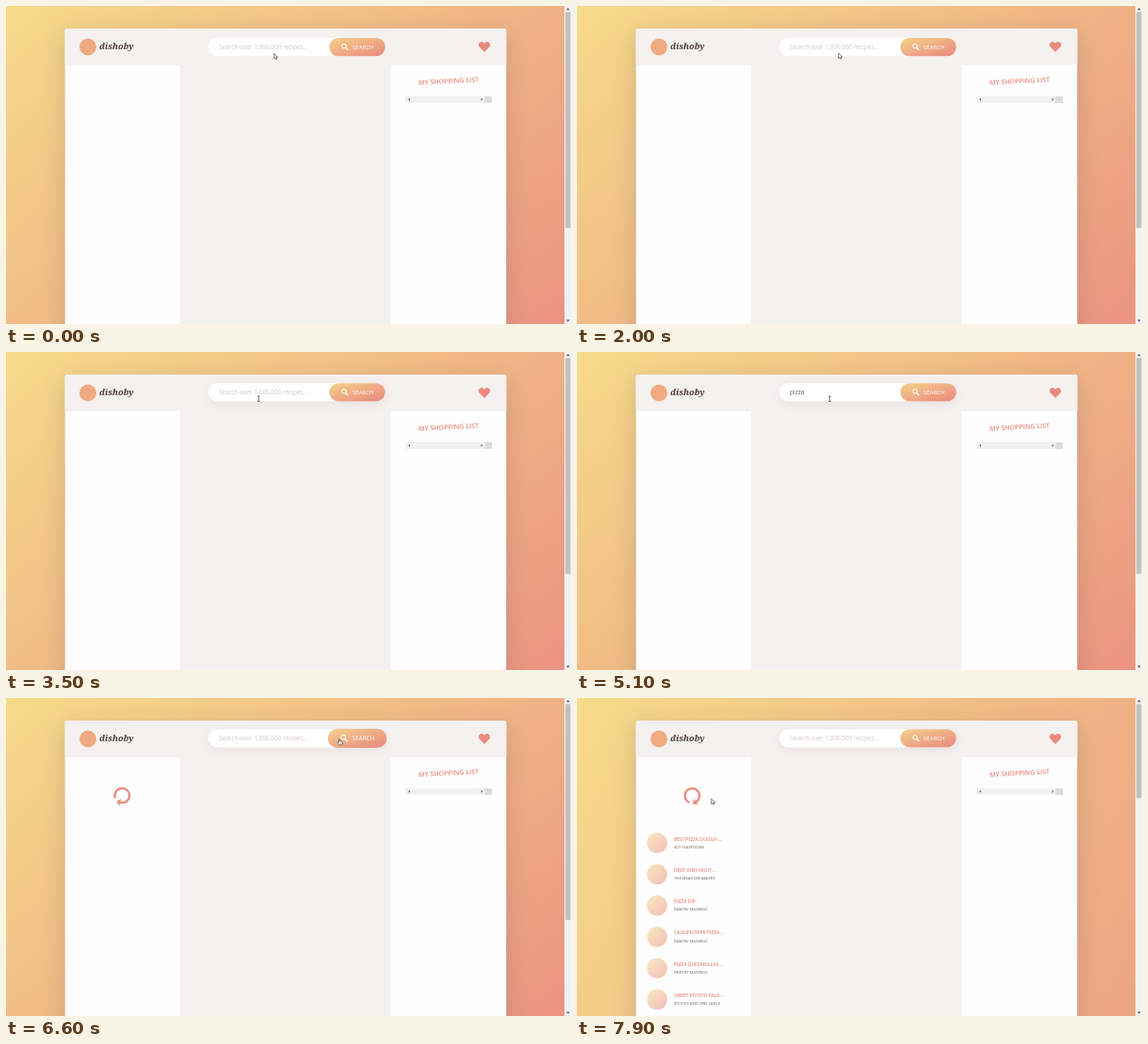
An HTML page that plays this animation: 600x338 px, repeating every 8 s.

```html
<!DOCTYPE html>
<html lang="en">
<head>
<meta charset="utf-8">
<title>Recipe search</title>
<style>
html, body { margin: 0; width: 100%; height: 100%; overflow: hidden; background: #fff; }
svg { display: block; width: 100vw; height: 100vh; }
text { font-family: "Open Sans", "Noto Sans", sans-serif; }
.brand { font: italic bold 9.2px "Noto Serif", serif; fill: #4a3b37; }
.coral { fill: #e98a7d; }
.muted { fill: #8d8380; }
</style>
</head>
<body>
<svg id="stage" viewBox="0 0 600 338" preserveAspectRatio="none">
  <defs>
    <linearGradient id="page" gradientUnits="userSpaceOnUse">
      <stop stop-color="#f6db8a"/><stop offset="1" stop-color="#e98780"/>
    </linearGradient>
    <linearGradient id="warm" gradientUnits="userSpaceOnUse" x1="364" y1="15" x2="382" y2="72">
      <stop offset=".2" stop-color="#f4d188"/><stop offset=".8" stop-color="#e98880"/>
    </linearGradient>
    <linearGradient id="dish" x2="1" y2="1">
      <stop stop-color="#f8e8c0"/><stop offset="1" stop-color="#f3beb8"/>
    </linearGradient>
    <filter id="blur" filterUnits="userSpaceOnUse" x="-20" y="-40" width="640" height="600"><feGaussianBlur stdDeviation="11.7"/></filter>
    <filter id="soft" filterUnits="userSpaceOnUse" x="180" y="0" width="260" height="100"><feGaussianBlur stdDeviation="5.5"/></filter>
  </defs>

  <rect width="600" height="338" fill="url(#page)"/>
  <rect id="shade" x="61" y="30" width="472" rx="3" fill="#655a56" opacity=".24" filter="url(#blur)"/>
  <rect x="62.7" y="24" width="468.5" height="340" rx="2.3" fill="#fefefe"/>
  <path d="M62.7 63V26.3a2.3 2.3 0 0 1 2.3-2.3H529a2.3 2.3 0 0 1 2.3 2.3V63H408.5V338H185V63Z" fill="#f5f1f0"/>

  <circle cx="87" cy="43.5" r="9" fill="#efaa80"/>
  <text class="brand" x="99" y="46">dishoby</text>

  <g id="search">
    <rect id="lift" x="215" y="36.7" width="188" height="19" rx="9.5" fill="#655a56" filter="url(#soft)"/>
    <rect x="214.7" y="34" width="188" height="19.2" rx="9.6" fill="#fff"/>
    <text id="query" x="226" y="45.8" font-size="6.5"></text>
    <rect id="caret" y="39.5" width=".5" height="8" fill="#655a56"/>
    <g id="button">
      <rect x="343.3" y="34" width="59.5" height="19.2" rx="9.6" fill="url(#warm)"/>
      <g fill="none" stroke="#fff" stroke-linecap="round">
        <circle cx="359" cy="42.6" r="2.3" stroke-width="1"/><path d="M360.9 44.6l2 2" stroke-width="1.4"/>
      </g>
      <text x="368" y="45.6" font-size="6" fill="#fff">SEARCH</text>
    </g>
  </g>

  <path class="coral" d="M508 49L502.900 43.700C500.500 41 502.500 38 505 38C506.500 38 507.500 39 508 39.800C508.500 39 509.500 38 511 38C513.500 38 515.500 41 513.100 43.700Z"/>
  <text class="coral" transform="translate(470 82.300) skewY(-3)" text-anchor="middle" font-size="7" font-weight="600">MY SHOPPING LIST</text>
  <rect x="424" y="96" width="92" height="7" fill="#f0f0f0"/>
  <rect x="508.500" y="96" width="7.500" height="7" fill="#dcdcdc"/>
  <path d="M429 97.700v3.200l-2-1.600zM504.500 97.700v3.200l2-1.600z" fill="#777"/>

  <g id="results"></g>
  <path id="spinner" class="coral" d="M19.315 10h-2.372C16.900 5.400 13.300 1.800 8.774 1.800A8.200 8.200 0 1 0 13.807 16.460L12.400 14.960A6.140 6.140 0 1 1 14.900 10H12.227L15.721 13.894Z"/>

  <rect x="593" width="7" height="338" fill="#f1f1f1"/>
  <rect id="thumb" x="594" y="6.500" width="5.500" fill="#c1c1c1"/>
  <path d="M595 4.200h3.600l-1.800-2.200zM595 333.500h3.600l-1.800 2.200z" fill="#555"/>

  <g id="pointer" stroke-linejoin="round">
    <path id="arrow" d="M0 0V5.600L1.300 4.500L2.200 6.400L3.100 6L2.300 4.200H4Z" fill="#fff" stroke="#333" stroke-width=".6"/>
    <path id="beam" d="M-1.300 -2.800H1.300M0 -2.800V2.800M-1.300 2.800H1.300" fill="none" stroke="#333" stroke-width=".7"/>
    <path id="hand" d="M-.6 .4Q0 -.5 .6 .4V2.500L3.200 3.100Q3.700 3.300 3.600 4L3 6.300H-.2L-2 3.800Q-1.800 2.900 -.6 3.800Z" fill="#fff" stroke="#333" stroke-width=".6"/>
  </g>
</svg>
<script>
const $ = id => document.getElementById(id);
const LOOP = 8000, STEP = 100;
const FOCUS = 2900, HOVER = 6000, CLICK = 6160, LEAVE = 6800, LOADED = 7850;
const KEYS = [4000, 4150, 4300, 4450, 4600];
const WORD = "pizza", HINT = "Search over 1,000,000 recipes...";
const RECIPES = [
  ["BEST PIZZA DOUGH ...", "307 TEASPOONS"],
  ["DEEP DISH FRUIT ...", "THE MEADOW BAKERS"],
  ["PIZZA DIP", "PANTRY MUSINGS"],
  ["CAULIFLOWER PIZZA ...", "PANTRY MUSINGS"],
  ["PIZZA QUESADILLAS ...", "PANTRY MUSINGS"],
  ["SWEET POTATO KALE ...", "SIX FIGS AND ONE LADLE"]
];
// time, x, y of the pointer
const PATH = [
  [0, 284.700, 50.500], [1200, 284.700, 50.500], [1400, 279, 50], [1900, 277.700, 50],
  [2100, 277.700, 50], [2700, 268.300, 49.800], [5300, 268.300, 49.800],
  [6000, 354, 43.500], [6700, 354, 43.500], [7200, 148.700, 107], [7400, 148.700, 107], [7800, 142.700, 107]
];

$("results").innerHTML = RECIPES.map(([title, author], i) => {
  const y = 154 + i * 33.300;
  return `<circle cx="85" cy="${y}" r="10.800" fill="url(#dish)"/>
    <text class="coral" x="103" y="${y - 2.500}" font-size="4.900" font-weight="600">${title}</text>
    <text class="muted" x="103" y="${y + 5.700}" font-size="4.100" font-weight="600">${author}</text>`;
}).join("");

const ease = (t, from, span) => {
  const p = Math.min(1, Math.max(0, (t - from) / span));
  return p * p * (3 - 2 * p);
};
const show = (id, on) => $(id).setAttribute("visibility", on ? "visible" : "hidden");

function pointerAt(t) {
  const i = PATH.findIndex(p => p[0] > t);
  if (i < 0) return PATH[PATH.length - 1].slice(1);
  const [t0, x0, y0] = PATH[i - 1], [t1, x1, y1] = PATH[i];
  const k = ease(t, t0, t1 - t0);
  return [x0 + (x1 - x0) * k, y0 + (y1 - y0) * k];
}

function layPage(height) {
  // CSS "to right bottom" over a 593px wide page
  const w = 593, k = w * height / (w * w + height * height);
  const dx = height * k, dy = w * k, g = $("page");
  Object.entries({ x1: w / 2 - dx, y1: height / 2 - dy, x2: w / 2 + dx, y2: height / 2 + dy })
    .forEach(([name, v]) => g.setAttribute(name, v));
  $("shade").setAttribute("height", height - 46);
  $("thumb").setAttribute("height", 325 * 338 / height);
}

function drawQuery(t) {
  const typed = t < CLICK ? KEYS.filter(k => k <= t).length : 0;
  const q = $("query");
  q.textContent = typed ? WORD.slice(0, typed) : HINT;
  q.setAttribute("fill", typed ? "#655a56" : "#d2c8c4");
  const since = typed ? KEYS[typed - 1] : FOCUS;
  show("caret", t >= FOCUS && t < CLICK && (t - since) % 1000 < 500);
  $("caret").setAttribute("x", 226.200 + (typed ? q.getComputedTextLength() : 0));
}

function draw(t) {
  const loaded = t >= LOADED;
  layPage(loaded ? 1100 : 479);
  show("results", loaded);

  const focus = ease(t, FOCUS, 300);
  $("search").setAttribute("transform", `translate(0 ${-0.8 * focus})`);
  $("lift").setAttribute("opacity", 0.1 * focus);
  const size = 1 + 0.05 * (ease(t, HOVER, 200) - ease(t, LEAVE, 200));
  $("button").setAttribute("transform", `translate(373 43.600) scale(${size}) translate(-373 -43.600)`);
  drawQuery(t);

  show("spinner", t >= CLICK);
  $("spinner").setAttribute("transform",
    `translate(123 105) rotate(${(t - CLICK) * 360 / 1500}) scale(1.080) translate(-10 -10)`);

  const [x, y] = pointerAt(t);
  const over = x > 343 && y < 54, text = !over && t >= 2600 && y < 52;
  $("pointer").setAttribute("transform", `translate(${x} ${y})`);
  show("hand", over);
  show("beam", text);
  show("arrow", !over && !text);
}

const start = performance.now();
function tick(now) {
  const t = Math.max(0, now - start) % LOOP;
  draw(Math.floor(t / STEP) * STEP);
  requestAnimationFrame(tick);
}
draw(0);
requestAnimationFrame(tick);
</script>
</body>
</html>
```
